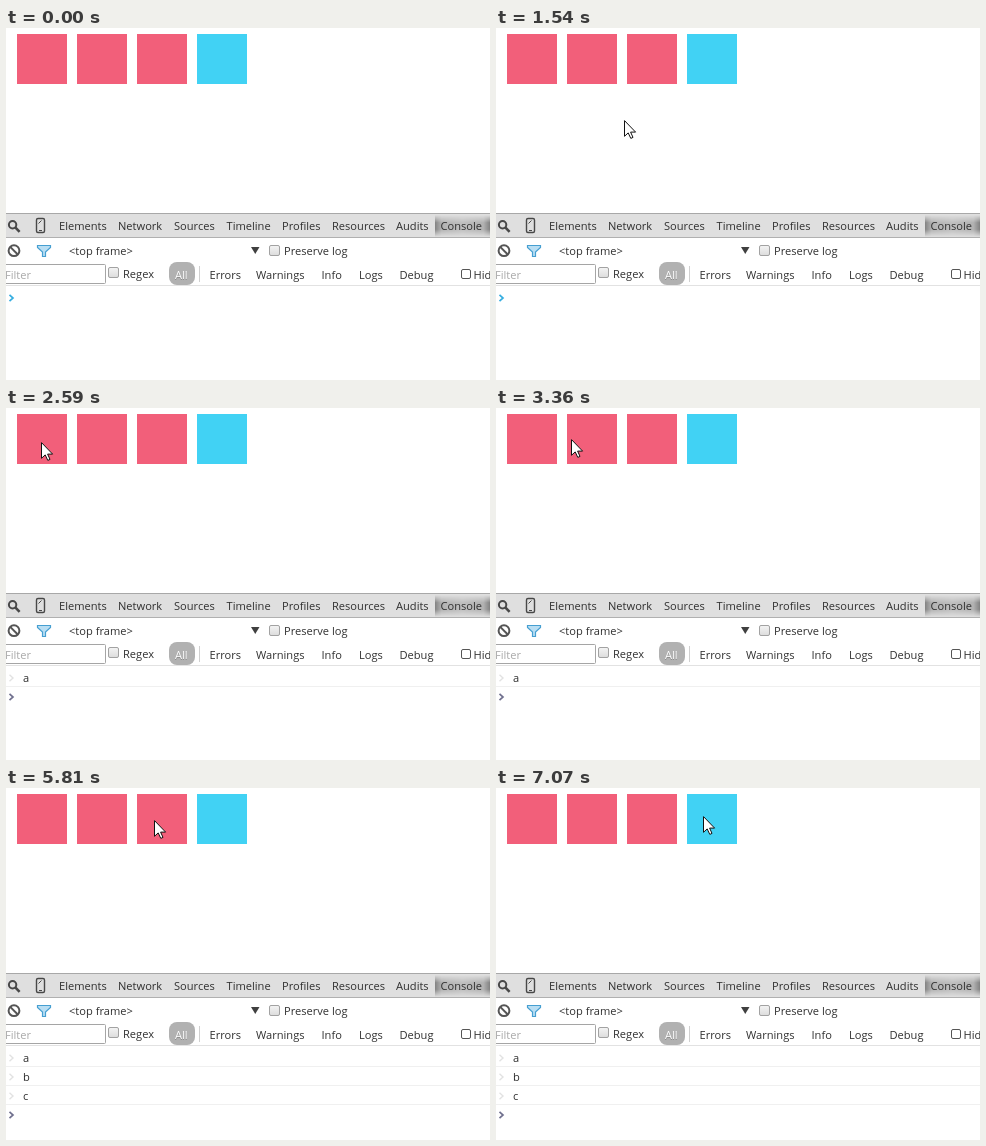
Recreate the animation shown at these times as an HTML page. Size 484 px wide and 352 px high, loop 8 s.

```html
<!DOCTYPE html>
<html lang="en">
<head>
<meta charset="utf-8">
<title>Console clicks</title>
<style>
  html, body { margin: 0; width: 100%; height: 100%; overflow: hidden; background: #fff; }
  svg { display: block; }
  text { font: 11.1px "Open Sans", "Noto Sans", sans-serif; fill: #303030; white-space: pre; }
  .crisp { shape-rendering: crispEdges; }
  .line { fill: none; stroke: #484848; }
</style>
</head>
<body>
<svg id="stage" width="484" height="352" viewBox="0 0 484 352">
  <defs>
    <linearGradient id="fade" x2="0" y2="1">
      <stop offset="0" stop-color="#fff" stop-opacity="0"/>
      <stop offset=".35" stop-color="#fff"/>
      <stop offset=".65" stop-color="#fff"/>
      <stop offset="1" stop-color="#fff" stop-opacity="0"/>
    </linearGradient>
    <linearGradient id="sides">
      <stop offset="0" stop-opacity=".42"/>
      <stop offset=".12" stop-opacity=".2"/>
      <stop offset=".5" stop-opacity=".14"/>
      <stop offset=".88" stop-opacity=".2"/>
      <stop offset="1" stop-opacity=".42"/>
    </linearGradient>
    <linearGradient id="box" x2="0" y2="1">
      <stop offset="0" stop-color="#f4f4f4"/>
      <stop offset="1" stop-color="#dcdcdc"/>
    </linearGradient>
    <mask id="soft"><rect x="429" y="187" width="55" height="22" fill="url(#fade)"/></mask>
  </defs>

  <g id="squares" class="crisp"></g>

  <g class="crisp">
    <rect y="185" width="484" height="25" fill="#dfdfdf"/>
    <rect y="185" width="484" height="1" fill="#a8a8a8"/>
    <rect y="209" width="484" height="1" fill="#b0b0b0"/>
    <rect y="257" width="484" height="1" fill="#e2e2e2"/>
    <rect x="193" y="238" width="1" height="16" fill="#d0d0d0"/>
  </g>
  <rect x="429" y="187" width="55" height="22" fill="url(#sides)" mask="url(#soft)"/>

  <!-- toolbar icons -->
  <g class="line">
    <circle cx="6.6" cy="196.8" r="3.7" stroke-width="2"/>
    <path d="M9.5 199.7 L13.6 203.8" stroke-width="2.6"/>
    <rect x="30.5" y="190.5" width="8" height="14" rx="1.5" stroke-width="1.4"/>
    <path d="M33 202.5h3M32.5 195.5l3 -3" stroke-width="1"/>
    <circle cx="8" cy="222.7" r="5.4" stroke="#555" stroke-width="2"/>
    <path d="M4.2 218.9 L11.8 226.5" stroke="#555" stroke-width="2"/>
  </g>
  <path d="M31.5 217.5h13v2l-5 4.5v4.5h-3v-4.5l-5 -4.5z" fill="#b9def3" stroke="#469fd1" stroke-width="1.2"/>
  <path d="M245 219h8.5l-4.25 7z" fill="#404040"/>
  <rect x="-5.5" y="236.5" width="105" height="19" rx="1" fill="#fff" stroke="#a5a5a5"/>
  <g fill="url(#box)" stroke="#a2a2a2">
    <rect x="263.5" y="217.5" width="10" height="10" rx="1.5"/>
    <rect x="102.5" y="239.5" width="10" height="10" rx="1.5"/>
    <rect x="455.5" y="241.5" width="9" height="9" rx="1.5" fill="#fff" stroke="#555"/>
  </g>
  <rect x="163" y="234" width="26" height="23" rx="8" fill="#b1b1b1"/>

  <g id="labels"></g>
  <g id="log"></g>
  <path id="prompt" d="M3.5 -3.2 L7 0 L3.5 3.2" fill="none" stroke-width="1.7"/>
  <path id="cursor" d="M.5 .6V16.3L4.2 12.9L6.8 18.4L9 17.4L6.6 12.1H11.6Z" fill="#fff" stroke="#111"/>
</svg>
<script>
const LOOP = 8000, STEP = 70;
const byId = id => document.getElementById(id);

function add(parent, tag, attrs, text) {
  const el = document.createElementNS("http://www.w3.org/2000/svg", tag);
  for (const key in attrs) el.setAttribute(key, attrs[key]);
  if (text) el.textContent = text;
  return parent.appendChild(el);
}

for (let i = 0; i < 4; i++) {
  add(byId("squares"), "rect", {
    x: 11 + 60 * i, y: 6, width: 50, height: 50, fill: i < 3 ? "#f25f7a" : "#41d2f4"
  });
}

const label = (y, x, text, fill = "#303030") =>
  add(byId("labels"), "text", { x, y, style: `fill:${fill}` }, text);

[[53, "Elements"], [112, "Network"], [168, "Sources"], [220.5, "Timeline"],
 [276, "Profiles"], [326, "Resources"], [390, "Audits"], [434.5, "Console"]
].forEach(([x, text]) => label(202, x, text));
[[63, "<top frame>"], [278, "Preserve log"]].forEach(([x, text]) => label(227, x, text));
[[203.5, "Errors"], [250, "Warnings"], [315.5, "Info"], [353, "Logs"],
 [393.5, "Debug"], [467.5, "Hide"]].forEach(([x, text]) => label(251, x, text));
label(250, 117, "Regex");
label(251, -1, "Filter", "#a9a9a9");
label(252, 169, "All", "#888");
label(251, 169, "All", "#fff");

const entries = [[2590, "a"], [4200, "b"], [5810, "c"]].map(([at, text], i) => {
  const g = add(byId("log"), "g", { transform: `translate(0 ${270 + 19 * i})` });
  add(g, "path", { d: "M3.5 -3.2 L7 0 L3.5 3.2", fill: "none", stroke: "#e2e2e2", "stroke-width": 1.4 });
  add(g, "text", { x: 17, y: 4 }, text);
  add(g, "rect", { y: 8, width: 484, height: 1, fill: "#f0f0f0", class: "crisp" });
  return { at, g };
});

// time, x, y of the pointer tip
const path = [
  [700, 390, 327], [1050, 272, 205], [1330, 190, 120], [1470, 152, 99], [1540, 128, 92],
  [1750, 84, 70], [1960, 54, 47], [2240, 35, 34],
  [3010, 35, 34], [3360, 75, 31], [3500, 86, 31],
  [3570, 86, 31], [3710, 92, 31],
  [4690, 92, 31], [4760, 93, 31], [5040, 128, 32], [5250, 148, 32],
  [6230, 148, 32], [6510, 186, 29], [6720, 206, 28],
  [7000, 206, 28], [7070, 207, 28], [LOOP, 207, 28]
];

function pointAt(t) {
  const i = Math.max(1, path.findIndex(p => p[0] >= t));
  const [t0, x0, y0] = path[i - 1], [t1, x1, y1] = path[i];
  const k = (t - t0) / (t1 - t0);
  return [Math.round(x0 + (x1 - x0) * k), Math.round(y0 + (y1 - y0) * k)];
}

function draw(ms) {
  const t = Math.floor((ms % LOOP) / STEP) * STEP;
  const cursor = byId("cursor"), prompt = byId("prompt");
  const visible = t >= path[0][0];
  cursor.style.display = visible ? "" : "none";
  if (visible) cursor.setAttribute("transform", `translate(${pointAt(t).join(" ")})`);

  let count = 0;
  for (const { at, g } of entries) {
    const shown = t >= at;
    g.style.display = shown ? "" : "none";
    if (shown) count++;
  }
  prompt.setAttribute("transform", `translate(0 ${270 + 19 * count})`);
  prompt.setAttribute("stroke", count ? "#70708e" : "#36aee0");
}

const start = performance.now();
function tick() {
  draw(performance.now() - start);
  requestAnimationFrame(tick);
}
tick();
</script>
</body>
</html>
```
